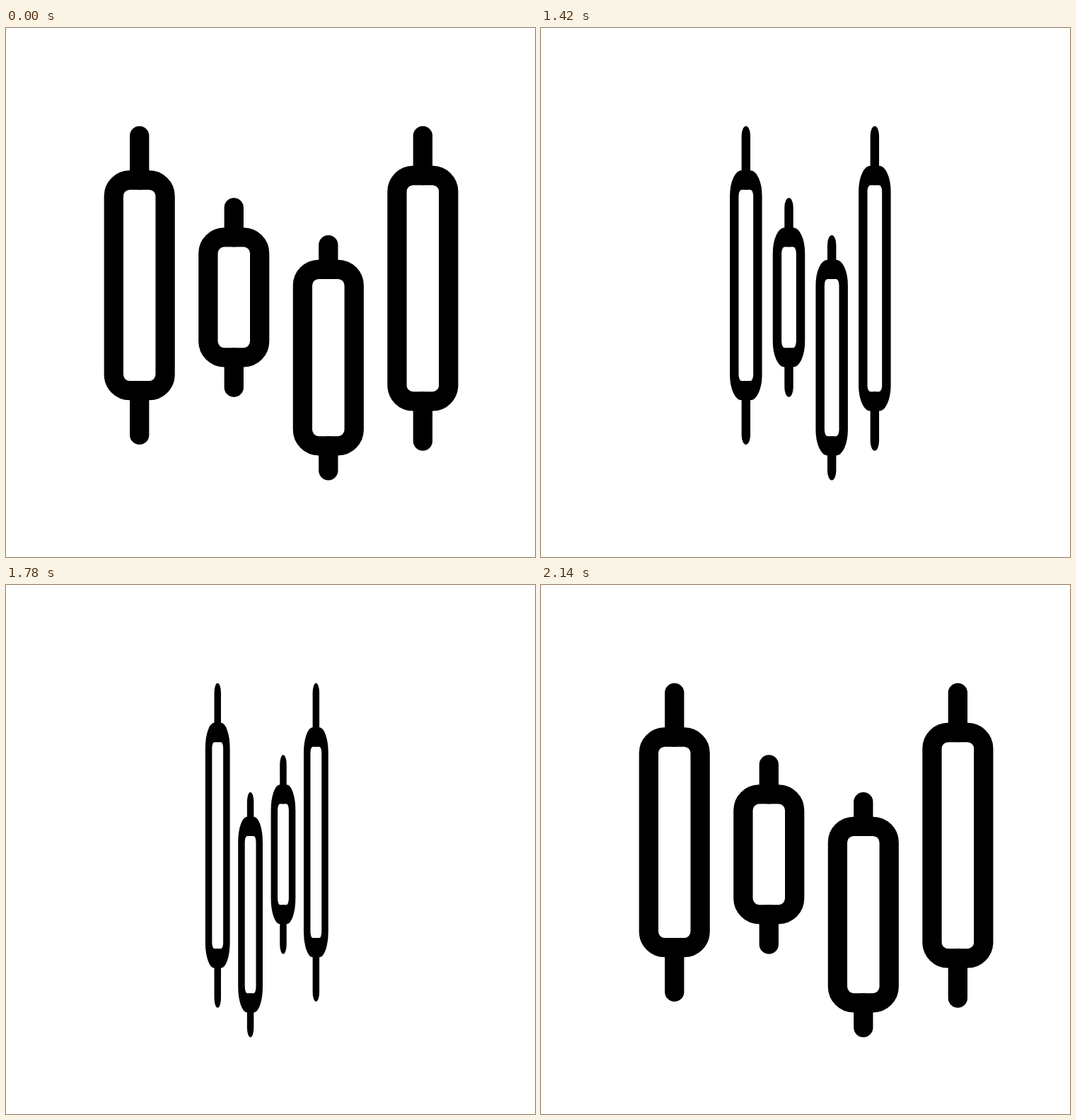
Recreate the animation shown at these times as an HTML page. Size 748 by 748 pixels, loop 2.98 s.

```html
<!DOCTYPE html>
<html lang="en">
<head>
<meta charset="utf-8">
<title>Candlestick flip</title>
<style>
  html, body { margin: 0; width: 100%; height: 100%; overflow: hidden; background: #fff; }
  svg { display: block; width: 100%; height: 100%; }
</style>
</head>
<body>
<svg viewBox="0 0 748 748">
  <g id="chart" fill="none" stroke="#000" stroke-width="27.3" stroke-linecap="round"></g>
</svg>
<script>
  const LOOP = 2980, STEP = 20;
  const FLIP_START = 1158, FLIP_LENGTH = 984;
  const AXIS = 374, BODY_WIDTH = 72.8, BODY_RADIUS = 22.7;

  const candles = [
    { x: 188.7, high: 152.3, top: 215, bottom: 512.7, low: 575.4 },
    { x: 322.25, high: 253.9, top: 295.9, bottom: 465.8, low: 508.2 },
    { x: 455.8, high: 306.6, top: 341.3, bottom: 590.8, low: 625.8 },
    { x: 589.35, high: 152.3, top: 208.5, bottom: 527.9, low: 584.1 }
  ];

  const chart = document.getElementById("chart");
  chart.innerHTML = candles.map(({ x, high, top, bottom, low }) => `
    <rect x="${x - BODY_WIDTH / 2}" y="${top}" width="${BODY_WIDTH}" height="${bottom - top}" rx="${BODY_RADIUS}"/>
    <path d="M${x} ${high}V${top}M${x} ${bottom}V${low}"/>`).join("");

  const clamp = v => Math.min(1, Math.max(0, v));
  const easeInOut = u => u * u * (3 - 2 * u);

  // One full turn around the vertical axis, seen without perspective.
  function render(time) {
    const t = Math.floor((time % LOOP) / STEP) * STEP;
    const turn = easeInOut(clamp((t - FLIP_START) / FLIP_LENGTH));
    const scale = Math.cos(turn * 2 * Math.PI);
    chart.setAttribute("transform", `matrix(${scale} 0 0 1 ${AXIS * (1 - scale)} 0)`);
  }

  const start = performance.now();
  function tick() {
    render(performance.now() - start);
    requestAnimationFrame(tick);
  }
  tick();
</script>
</body>
</html>
```
